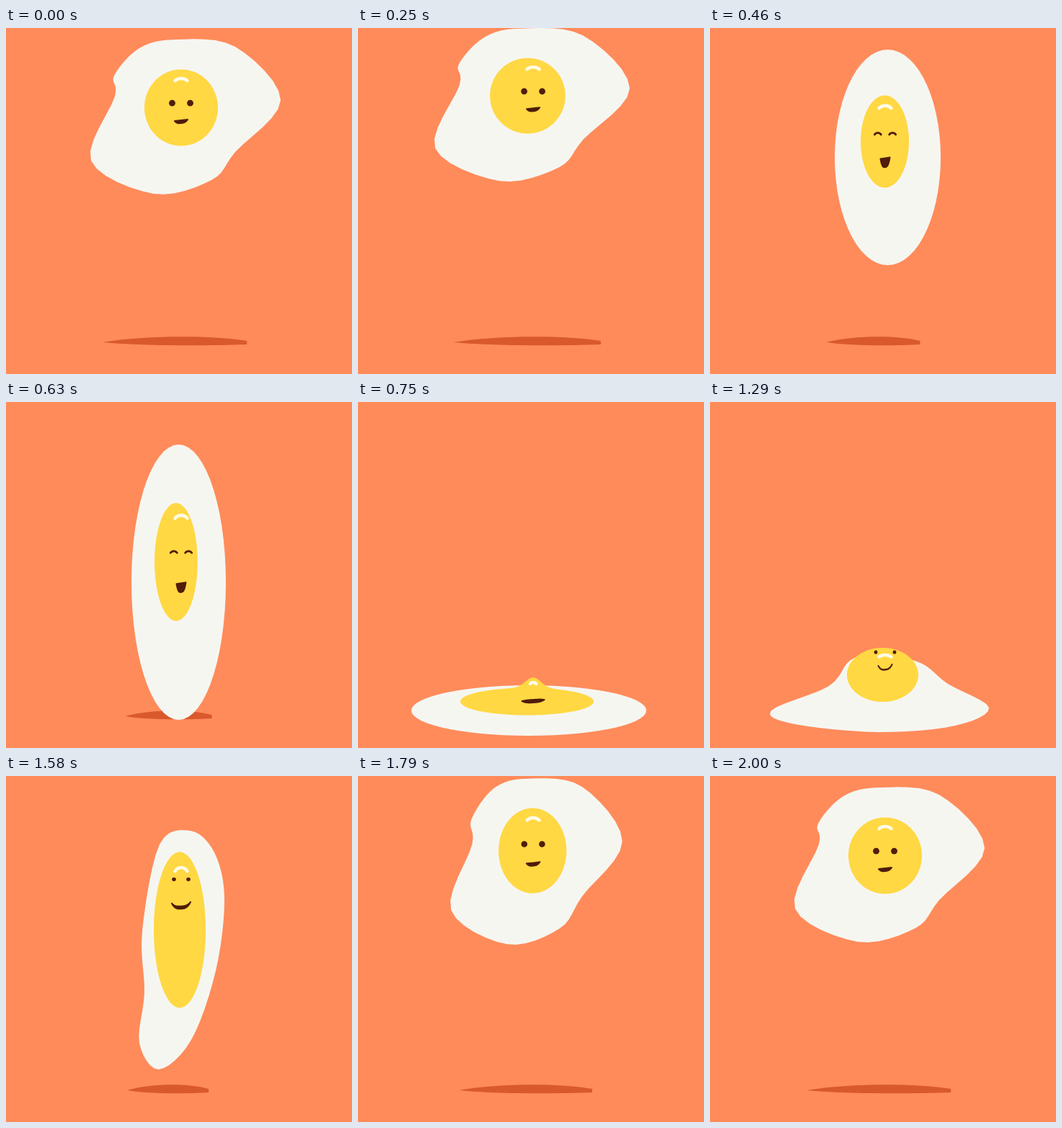
An HTML page with a canvas for the animation above (2.04 s loop, 480 px wide and 480 px high).

```html
<!DOCTYPE html>
<html lang="en">
<head>
<meta charset="utf-8">
<title>Bouncing egg</title>
<style>
html, body { margin: 0; width: 100%; height: 100%; overflow: hidden; background: #ff8b5a; }
canvas { display: block; width: 480px; height: 480px; }
</style>
</head>
<body>
<canvas id="stage" width="480" height="480"></canvas>
<script>
const ctx = document.getElementById('stage').getContext('2d');
const LOOP = 2040;
const STEPS = 60;
const FACE_X = 243;
const COLOR = { bg: '#ff8b5a', white: '#f6f6f1', yolk: '#ffd843', shine: '#fffbe6', ink: '#4f1d0a', shadow: '#d9592d' };

// Closed outline through a few key points, clockwise from the top
function spline(...knots) {
  const n = knots.length, per = STEPS / n;
  const at = i => knots[(i + n) % n];
  return Array.from({ length: STEPS }, (_, s) => {
    const i = Math.floor(s / per), u = s / per - i;
    const [p, a, b, q] = [at(i - 1), at(i), at(i + 1), at(i + 2)];
    return [0, 1].map(k => a[k] + u / 2 * (b[k] - p[k] +
      u * (2 * p[k] - 5 * a[k] + 4 * b[k] - q[k] + u * (3 * (a[k] - b[k]) + q[k] - p[k]))));
  });
}

// Superellipse inside a box; a power below 2 gives pointed ends
function oval(left, top, right, bottom, power = 2) {
  const bend = c => Math.sign(c) * Math.abs(c) ** (2 / power);
  return Array.from({ length: STEPS }, (_, s) => {
    const a = s / STEPS * 2 * Math.PI;
    return [(left + right + (right - left) * bend(Math.sin(a))) / 2,
      (top + bottom - (bottom - top) * bend(Math.cos(a))) / 2];
  });
}

// yolk: x, y, rx, ry, bump
// eyes: half gap, height on the yolk, rx, ry
// mouth: height on the yolk, half width, upper sag, lower sag, wave
const poses = {
  float: {
    white: spline([235, 16], [318, 26], [381, 100], [318, 172], [285, 211],
      [205, 230], [118, 184], [151, 95], [150, 66], [185, 28]),
    yolk: [243, 110.5, 51, 53, 0], eyes: [12.5, -.12, 4.4, 4.4], mouth: [.33, 9, 0, 4, 0]
  },
  fall: {
    white: oval(173, 30, 320, 329),
    yolk: [242.5, 157.5, 33.5, 64, 0], eyes: [10.2, -.17, 4.5, 2.5], mouth: [.36, 6.5, 0, 12.5, 0]
  },
  splat: {
    white: oval(74, 393, 400, 463),
    yolk: [234.5, 415.5, 92.5, 19, 14.5], eyes: [25, -.4, 0, 0], mouth: [-.08, 15.5, -1, 3, 0]
  },
  flat: {
    white: oval(18, 390, 440, 475, 1.4),
    yolk: [237, 426, 130, 16.5, 0], eyes: [34, -.43, 3.4, 2], mouth: [.27, 44, 0, 0, .8]
  },
  mound: {
    white: spline([235, 350], [292, 362], [330, 391], [387, 424], [340, 449],
      [235, 458], [118, 447], [85, 428], [165, 394], [195, 358]),
    yolk: [239.5, 378.5, 49.5, 37.5, 0], eyes: [13, -.84, 2.4, 2.6], mouth: [-.36, 9.5, 6, 6.5, 0]
  },
  leap: {
    white: spline([256, 76], [289, 106], [303, 170], [291, 270], [257, 366],
      [212, 407], [185, 370], [192, 300], [189, 215], [213, 95]),
    yolk: [241, 213.5, 36, 108, 0], eyes: [10, -.65, 2.8, 2.6], mouth: [-.35, 13, 5, 8.5, 0]
  }
};

// A pose as one flat list of channels, optionally stretched to a new box
function key(tick, name, box) {
  let { white, yolk, eyes, mouth } = poses[name];
  if (box) {
    const lo = [0, 1].map(k => Math.min(...white.map(p => p[k])));
    const hi = [0, 1].map(k => Math.max(...white.map(p => p[k])));
    const scale = lo.map((n, k) => (box[k + 2] - box[k]) / (hi[k] - n));
    const place = p => [0, 1].map(k => box[k] + (p[k] - lo[k]) * scale[k]);
    white = white.map(place);
    yolk = [...place(yolk), yolk[2] * scale[0], yolk[3] * scale[1], yolk[4]];
  }
  return { tick, values: [...yolk, ...eyes, ...mouth, ...white.flat()] };
}

const keys = [
  key(2, 'float'),
  key(6, 'float', [106, 0, 377, 213]),
  key(11, 'fall'),
  key(15, 'fall', [174, 59, 305, 441]),
  key(18, 'splat'),
  key(23, 'flat'),
  key(28, 'flat', [39, 388, 412, 468]),
  key(31, 'mound'),
  key(38, 'leap'),
  key(44, 'float', [122, 0, 374, 222]),
  key(48, 'float')
];

// Smooth interpolation through the keys, without overshoot
function valuesAt(v) {
  const last = keys.length - 1;
  let i = 0;
  while (i < last - 1 && v >= keys[i + 1].tick) i++;
  const a = keys[i], b = keys[i + 1], span = b.tick - a.tick;
  const u = Math.max(0, (v - a.tick) / span);
  const slope = (j, c) => (keys[j + 1].values[c] - keys[j].values[c]) / (keys[j + 1].tick - keys[j].tick);
  const tangent = (j, c) => {
    if (j === 0 || j === last) return 0;
    const p = slope(j - 1, c), q = slope(j, c);
    return p * q > 0 ? 2 * p * q / (p + q) : 0;
  };
  return a.values.map((n, c) => n + (b.values[c] - n) * u * u * (3 - 2 * u) +
    span * u * (1 - u) * ((1 - u) * tangent(i, c) - u * tangent(i + 1, c)));
}

function fillShape(points, color) {
  ctx.beginPath();
  for (const [x, y] of points) ctx.lineTo(x, y);
  ctx.closePath();
  ctx.fillStyle = color;
  ctx.fill();
}

// Wider under a wider egg, tapered on the left and blunt on the right
function drawShadow(white) {
  const xs = white.map(p => p[0]);
  const half = 21 + .3 * (Math.max(...xs) - Math.min(...xs));
  const mid = 212 + .22 * half;
  const l = mid - half, r = mid + half;
  ctx.beginPath();
  ctx.moveTo(l, 436);
  ctx.bezierCurveTo(l + half * .6, 426, r - half * .5, 426, r, 434);
  ctx.lineTo(r, 439);
  ctx.bezierCurveTo(r - half * .6, 441, l + half * .5, 441, l, 436);
  ctx.fillStyle = COLOR.shadow;
  ctx.fill();
}

function drawYolk([cx, cy, rx, ry, bump]) {
  const points = Array.from({ length: 180 }, (_, i) => {
    const a = i * Math.PI / 90, x = cx + rx * Math.cos(a), s = Math.sin(a);
    const lift = s < 0 ? bump * Math.exp(-(((x - FACE_X) / 15) ** 2)) : 0;
    return [x, cy + ry * s - lift];
  });
  fillShape(points, COLOR.yolk);
}

function arch(x, y, w, h, line, color) {
  ctx.beginPath();
  ctx.moveTo(x - w, y + h / 2);
  ctx.bezierCurveTo(x - w / 2, y - h * .8, x + w / 2, y - h * .8, x + w, y + h / 2);
  ctx.lineWidth = line;
  ctx.strokeStyle = color;
  ctx.stroke();
}

function drawShine([, cy, , ry, bump]) {
  arch(FACE_X, cy - bump - ry * .82 + 4.5, 8.5 - bump * .3, 1 + ry * .04, 4.5, COLOR.shine);
}

function drawEyes([, cy, , yolkRy], [gap, height, rx, ry], closed) {
  if (rx < .2) return;
  const y = cy + height * yolkRy;
  for (const x of [FACE_X - gap, FACE_X + gap]) {
    if (closed) arch(x, y, rx, ry, 2.8, COLOR.ink);
    else {
      ctx.beginPath();
      ctx.ellipse(x, y, rx, ry, 0, 0, 2 * Math.PI);
      ctx.fillStyle = COLOR.ink;
      ctx.fill();
    }
  }
}

function drawMouth([, cy, , ry], [height, w, top, low, wave]) {
  const edge = (u, sag) => [FACE_X + w * u, cy + height * ry - u +
    sag * (1 - Math.abs(u) ** 3) + wave * Math.sin(u * 9) * (1 - u * u)];
  const us = Array.from({ length: 41 }, (_, i) => i / 20 - 1);
  fillShape([...us.map(u => edge(u, top)), ...us.reverse().map(u => edge(u, low))], COLOR.ink);
  ctx.lineWidth = 2;
  ctx.strokeStyle = COLOR.ink;
  ctx.stroke();
}

function draw(v) {
  const values = valuesAt(v);
  const yolk = values.slice(0, 5), eyes = values.slice(5, 9), mouth = values.slice(9, 14);
  const white = Array.from({ length: STEPS }, (_, i) => values.slice(14 + 2 * i, 16 + 2 * i));
  ctx.fillStyle = COLOR.bg;
  ctx.fillRect(0, 0, 480, 480);
  ctx.lineCap = ctx.lineJoin = 'round';
  const airborne = Math.max(...white.map(p => p[1])) < 445;
  if (airborne) drawShadow(white);
  fillShape(white, COLOR.white);
  drawYolk(yolk);
  drawShine(yolk);
  drawEyes(yolk, eyes, v >= 8 && v < 18);
  drawMouth(yolk, mouth);
}

// 24 ticks per second, starting on whole hundredths
const tickAt = ms => Math.ceil((Math.floor(ms / 10) * 10 + 5) * 3 / 125) - 1;

const start = performance.now();
function loop() {
  draw(tickAt((performance.now() - start) % LOOP));
  requestAnimationFrame(loop);
}
loop();
</script>
</body>
</html>
```
